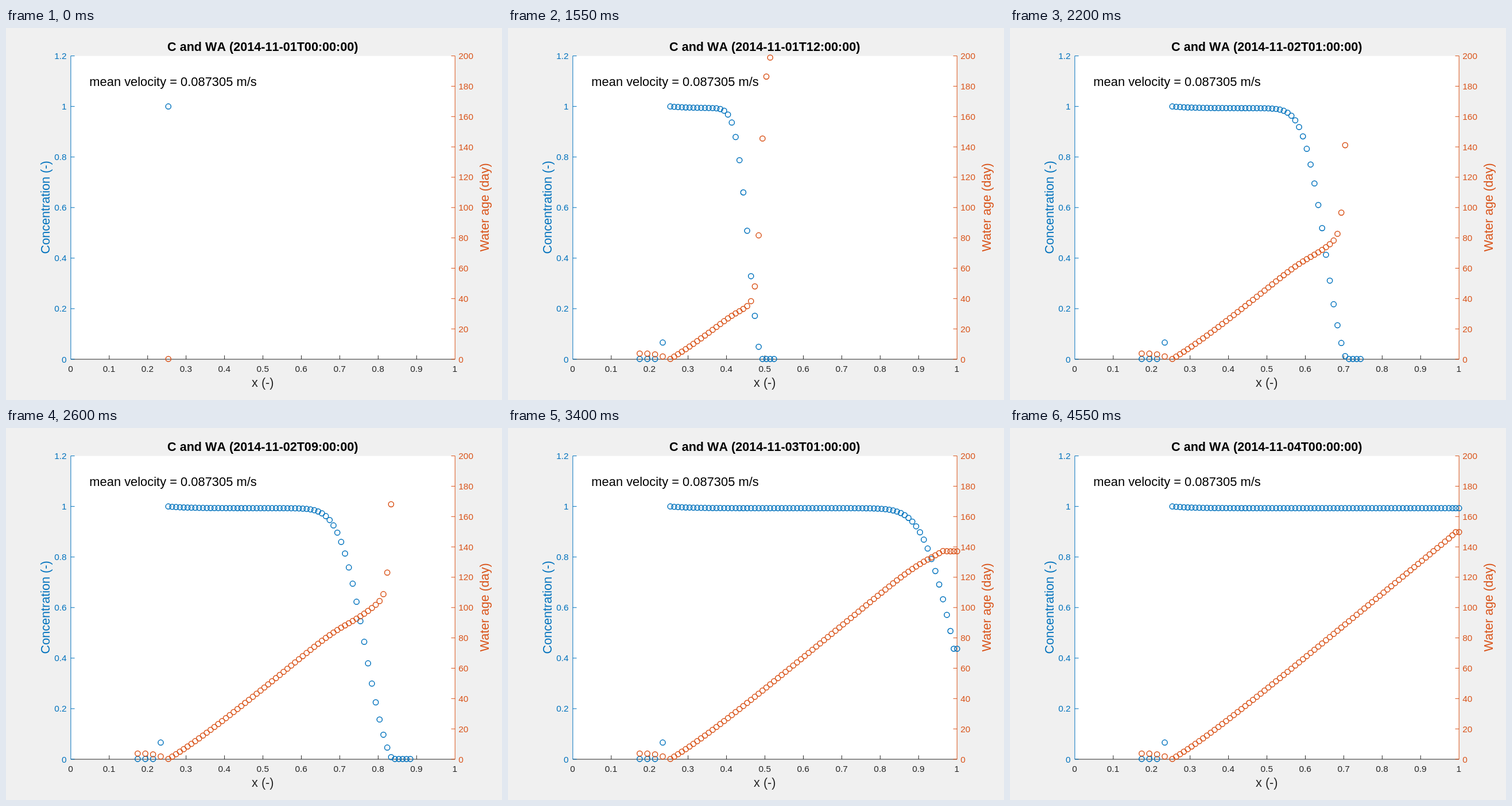
Write an HTML page that moves like this. It is 864 by 648 pixels and loops after 4.6 s.

```html
<!DOCTYPE html>
<html lang="en">
<head>
<meta charset="utf-8">
<title>C and WA</title>
<style>
  html, body { margin: 0; width: 100%; height: 100%; overflow: hidden; background: #f0f0f0; }
  svg { display: block; width: 864px; height: 648px; font-family: "Liberation Sans", Arial, sans-serif; font-size: 21.6px; }
  .tick { font-size: 15.43px; }
  .tick, #title { font-kerning: none; }
  #title { font-weight: bold; }
  path { fill: none; stroke-width: 1; }
  .dots { stroke-width: 1.5; }
</style>
</head>
<body>
<svg viewBox="0 0 864 648">
  <rect width="864" height="648" fill="#f0f0f0"/>
  <rect x="112.9" y="48.6" width="669.3" height="528.4" fill="#fff"/>
  <g id="axes"></g>
  <text id="title" x="447.3" y="40" text-anchor="middle"></text>
  <text x="145.3" y="101" font-size="21.9">mean velocity = 0.087305 m/s</text>
  <text x="447.3" y="625" text-anchor="middle" fill="#262626">x (-)</text>
  <text transform="translate(75.8 312.4) rotate(-90)" text-anchor="middle" fill="#0072bd">Concentration (-)</text>
  <text transform="translate(840.5 312.4) rotate(-90)" text-anchor="middle" fill="#d95319">Water age (day)</text>
  <path id="conc" class="dots" stroke="#0072bd"/>
  <path id="age" class="dots" stroke="#d95319"/>
</svg>
<script>
const $ = id => document.getElementById(id);
const { exp, min, max, round, sin, PI } = Math;
const BLUE = '#0072bd', ORANGE = '#d95319', DARK = '#262626';
const LEFT = 112.9, RIGHT = 782.2, TOP = 48.6, BOTTOM = 577;
const LOOP = 4600, HOLD = 1000, STEP = 50;
const OUTLET = 74;

function drawAxes() {
  const label = (x, y, anchor, color, s) =>
    `<text class="tick" x="${x}" y="${y}" text-anchor="${anchor}" fill="${color}">${s}</text>`;
  const line = (color, d) => `<path stroke="${color}" d="${d}"/>`;
  let labels = '', dx = `M${LEFT} ${BOTTOM}H${RIGHT}`;
  let dl = `M${LEFT} ${TOP}V${BOTTOM}`, dr = `M${RIGHT} ${TOP}V${BOTTOM}`;
  for (let i = 0; i <= 10; i++) {
    const x = LEFT + i * (RIGHT - LEFT) / 10, y = BOTTOM - i * (BOTTOM - TOP) / 10;
    if (i % 10) dx += `M${x} ${BOTTOM}v-6.7`;
    dr += `M${RIGHT} ${y}h-6.7`;
    labels += label(x - .3, 599, 'middle', DARK, i / 10) + label(788.3, y + 5.5, 'start', ORANGE, i * 20);
  }
  for (let i = 0; i <= 6; i++) {
    const y = BOTTOM - i * (BOTTOM - TOP) / 6;
    dl += `M${LEFT} ${y}h6.7`;
    labels += label(105.6, y + 5.5, 'end', BLUE, i / 5);
  }
  $('axes').innerHTML = line(DARK, dx) + line(BLUE, dl) + line(ORANGE, dr) + labels;
}

const cellX = k => min(282.8 + 6.69 * k, 776.5 + 5.8 * (k - OUTLET));
const concY = c => BOTTOM - 440.3 * c;
const dot = (x, y) => `M${(x - 4.6).toFixed(2)} ${y.toFixed(2)}a4.6 4.6 0 1 0 9.2 0a4.6 4.6 0 1 0 -9.2 0`;
const ramp = (x, scale) => 1 - exp(-x / scale);

// a front that travels downstream and spreads: long shoulder behind, sharp toe ahead
function flow(h) {
  const mid = 1.4 * h + .2 + 4.4 * ramp(h, 10);
  const back = .06 + 1.88 * ramp(h, 35);
  const ahead = .2 + .032 * h;
  const toe = mid + 6.2 * ahead;
  const deficit = .56 * ((72 - h) / 23) ** 2;

  function conc(k) {
    if (k === 0) return 1;
    const d = k - mid, u = -d / back;
    const n = d < 0
      ? 1 - .5 * exp(-u * (.19 + .0196 * u))
      : .5 * max(0, 1 - d / (toe - mid)) ** 1.4;
    return max(0, min(n, 1 - deficit * exp((k - OUTLET) / 3)));
  }

  // settled line, lagging inside the front, shooting up at its toe
  function ageY(k) {
    const settled = 576.5 - 5.55 * k + 15.5 * ramp(k, 10);
    const lag = 1.1 * h ** .77 * (1 - conc(k) ** 3);
    const surge = 420 * ramp(h - 1, 3) / (1 + exp(1.7 * (toe - k - .1)));
    const mixing = 25 * sin(PI * max(0, h - 44) / 28) * max(0, k - 71) / 3;
    return settled + lag - surge + mixing;
  }

  return { conc, ageY };
}

function draw(h) {
  $('title').textContent = `C and WA (${new Date(Date.UTC(2014, 10, 1, h)).toISOString().slice(0, 19)})`;
  let blue = dot(cellX(0), concY(1)), orange = dot(cellX(0), 576.5);
  if (h > 0) {
    // four wider cells upstream of the inlet settle within a few hours
    const mix = ramp(h - 1, 2);
    for (let i = 0; i < 4; i++) {
      const x = 229.4 + 13.37 * i;
      blue += dot(x, concY(i < 3 ? .001 : .052 + .014 * mix));
      orange += dot(x, 567 + 2 * i * (1 - mix) + .19 * i ** 3 * mix);
    }
    const { conc, ageY } = flow(h);
    const last = min(OUTLET + 1, round(5.75 + 1.73 * h));
    for (let i = 1; i <= last; i++) {
      const k = min(i, OUTLET), x = cellX(i), y = ageY(k);
      const plateau = 1 - .0068 * ramp(k, 5);
      blue += dot(x, concY(max(.001, conc(k) * plateau)));
      if (y >= TOP) orange += dot(x, y);
    }
  }
  $('conc').setAttribute('d', blue);
  $('age').setAttribute('d', orange);
}

drawAxes();
const start = performance.now();
let shown = -1;
function tick() {
  const t = (performance.now() - start) % LOOP;
  const h = t < HOLD ? 0 : 1 + Math.floor((t - HOLD) / STEP);
  if (h !== shown) draw(shown = h);
  requestAnimationFrame(tick);
}
tick();
</script>
</body>
</html>
```
